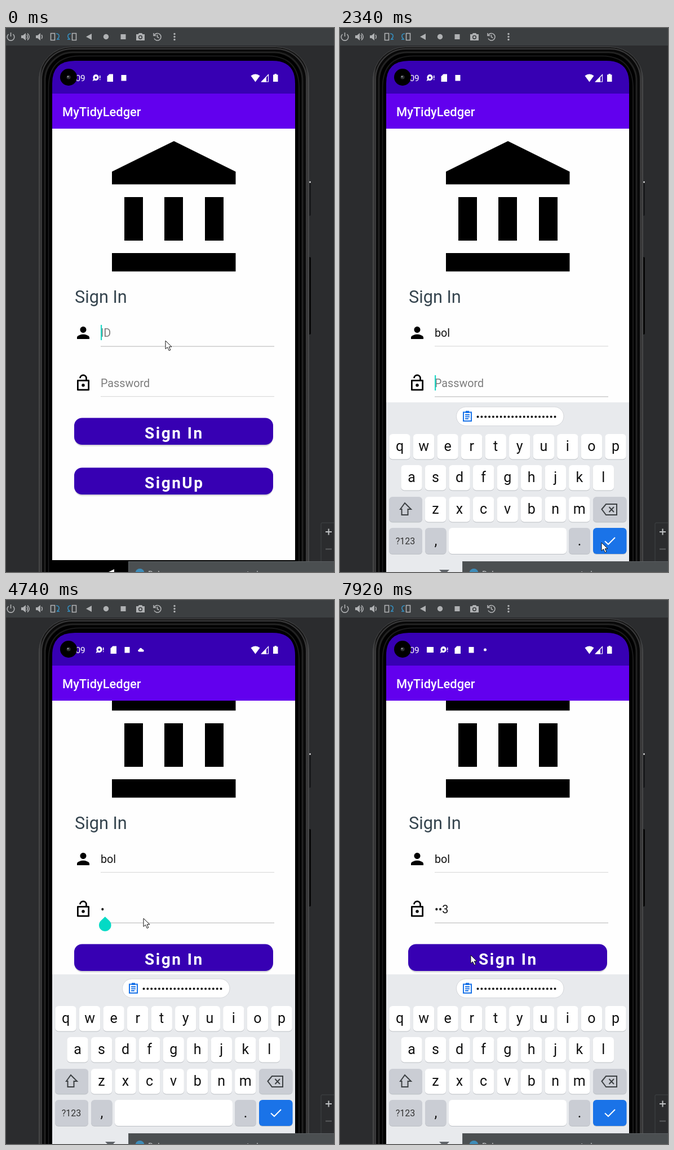
Animation of 582 by 962 pixels, one loop 8 s. Source, as an HTML page:

```html
<!DOCTYPE html>
<html lang="en">
<head>
<meta charset="utf-8">
<title>Sign-in screen</title>
<style>
  html, body { margin: 0; width: 100%; height: 100%; overflow: hidden; background: #2b2c2e; }
  svg { display: block; width: 582px; height: 962px; }
  text { font-family: Roboto, sans-serif; white-space: pre; }
  .field { font-size: 19.74px; }
  .key { font-size: 25px; text-anchor: middle; fill: #111; }
  .hint { font-size: 10.5px; text-anchor: middle; fill: #5f6368; }
  .button { font-size: 28px; font-weight: 700; letter-spacing: .0893em; fill: #fff; }
  .line { fill: none; stroke-width: 2; }
</style>
</head>
<body>
<svg viewBox="0 0 582 962">
  <defs>
    <clipPath id="screenClip"><path d="M82 962V98Q82 58 122 58H473Q513 58 513 98V962z"/></clipPath>
    <clipPath id="pageClip"><rect x="82" y="178" width="431" height="763"/></clipPath>
    <linearGradient id="rim">
      <stop offset="0" stop-color="#4a4a4b"/><stop offset=".012" stop-color="#161616"/>
      <stop offset=".985" stop-color="#161616"/><stop offset="1" stop-color="#4a4a4b"/>
    </linearGradient>
  </defs>

  <rect width="582" height="962" fill="#2b2c2e"/>
  <rect width="582" height="31" fill="#3c3f41"/>
  <g id="toolbar" class="line" stroke="#afb1b3" style="stroke-width:1.6">
    <path d="M4.5 11A6.3 6.3 0 1 0 12.500 11M8.500 8V15"/>
    <path d="M27 13H30L35 9V22L30 18H27z" fill="#afb1b3" stroke="none"/>
    <path d="M37 12Q39.500 15.500 37 19M38 9.500Q44.500 15.500 38 21.500"/>
    <path d="M53 13H56L61 9V22L56 18H53z" fill="#afb1b3" stroke="none"/>
    <path d="M63 12Q65.500 15.500 63 19"/>
    <path d="M79.500 9.500H86.500V21.500H79.500zM117.500 9.500H124.500V21.500H117.500z"/>
    <path d="M89 10Q95 10 94 16L91 20H95M115 10Q109 10 110 16L113 20H109" stroke="#3592c4"/>
    <g fill="#afb1b3" stroke="none">
      <path d="M142 15.500L152 10V21z"/><circle cx="177.500" cy="15.500" r="4.700"/>
      <rect x="203.500" y="11" width="9" height="9"/>
      <path fill-rule="evenodd" d="M231 11H234.500L236 9H241L242.500 11H246V22H231zM238.500 12.700A3.600 3.600 0 1 0 238.500 19.900A3.600 3.600 0 1 0 238.500 12.700z"/>
      <circle cx="238.500" cy="16.300" r="2"/>
      <circle cx="299" cy="10.500" r="1.700"/><circle cx="299" cy="15.500" r="1.700"/><circle cx="299" cy="20.500" r="1.700"/>
    </g>
    <path d="M262 9V13.500H266.500M263 13A6.300 6.300 0 1 1 263 18.500M268.500 12V16L271.500 17.500"/>
  </g>

  <rect x="536" y="271" width="5" height="61" rx="2" fill="#17181a"/>
  <rect x="538.500" y="271" width="2" height="3" fill="#eee"/>
  <rect x="536" y="405" width="5" height="137" rx="2" fill="#060606"/>
  <rect x="58.500" y="33.500" width="479" height="1000" rx="58" fill="url(#rim)" stroke="#48494a"/>
  <rect x="63" y="37" width="470" height="1000" rx="54" fill="#090909" stroke="#3a3a3b" stroke-width="2"/>
  <rect x="69" y="43" width="457" height="1000" rx="50" fill="#000" stroke="#222" stroke-width="3"/>
  <path d="M75.500 962V106Q75.500 50 130 49.500H465Q520 50 520 106V962" class="line" stroke="#1b1b1c"/>

  <g clip-path="url(#screenClip)">
    <rect x="82" y="58" width="431" height="904" fill="#000"/>
    <path d="M192 957L181 962.500L192 968z" fill="#fff"/>
    <rect x="82" y="178" width="431" height="763" fill="#fefefe"/>
    <g clip-path="url(#pageClip)">
      <g id="page">
        <path d="M298 200L407.500 254V276.500H188V254zM210 299H243V376H210zM281 299H314V376H281zM353 299H386V376H353zM188 398H407.500V430.500H188z"/>
        <text x="122" y="485.500" font-size="30.700" fill="#36454f">Sign In</text>
        <path transform="translate(120.500 522.500) scale(1.375)" d="M12 12c2.210 0 4-1.790 4-4s-1.790-4-4-4-4 1.790-4 4 1.790 4 4 4zm0 2c-2.670 0-8 1.340-8 4v2h16v-2c0-2.660-5.330-4-8-4z"/>
        <g transform="translate(120.500 611) scale(1.375)">
          <path class="line" d="M8 6A4 4 0 0 1 16 6V9M5 9H19V21H5z" stroke="#000" stroke-linejoin="round"/>
          <circle cx="12" cy="15" r="2"/>
        </g>
        <rect id="idLine" x="168" y="562" width="308"/>
        <rect id="pwLine" x="168" y="651" width="308"/>
        <text id="idText" class="field" x="168" y="546"/>
        <text id="pwText" class="field" x="168" y="635"/>
        <rect id="caret" width="2.200" height="27" fill="#1fd8c6"/>
        <path id="handle" d="M175.800 641L183.400 648.300A10.800 10.800 0 1 1 168.200 648.300z" fill="#03dac5"/>
        <rect x="121.500" y="691" width="352" height="48.500" rx="14" fill="#d9d9dc"/>
        <rect id="signIn" x="121" y="689.500" width="353" height="47.500" rx="14"/>
        <text class="button" x="246" y="726">Sign In</text>
        <rect x="121.500" y="779" width="352" height="48.500" rx="14" fill="#d9d9dc"/>
        <rect x="121" y="777.500" width="353" height="47.500" rx="14" fill="#3700b3"/>
        <text class="button" x="246" y="814">SignUp</text>
      </g>
      <rect id="scrollbar" x="509" width="4" height="349" fill="#a9a9a9"/>
    </g>

    <rect x="82" y="58" width="431" height="58" fill="#3700b3"/>
    <rect x="82" y="116" width="431" height="62" fill="#6200ee"/>
    <text x="100" y="155.500" font-size="21.900" font-weight="500" fill="#fff">MyTidyLedger</text>
    <text x="123.500" y="94" font-size="15.350" fill="#fff">09</text>
    <circle cx="111" cy="87" r="15" fill="#000"/>
    <circle cx="111" cy="87" r="3.600" fill="#2e3033"/><circle cx="110" cy="86" r="1.300" fill="#9a9da2"/>
    <g fill="#fff">
      <rect id="mail" x="154" y="83" width="12" height="10"/>
      <g id="notices">
        <path fill-rule="evenodd" d="M159.500 82A5.500 5.500 0 1 1 157 92.500L153.500 94L155 90A5.500 5.500 0 0 1 159.500 82zM159.500 85.700A2 2 0 1 0 159.500 89.700A2 2 0 1 0 159.500 85.700z"/>
        <path d="M166 84H167.500V89H166zM166 90.500H167.500V92H166z"/>
        <path d="M183.500 81.500H190V95H179.500V85.500z"/>
        <rect x="204.500" y="83" width="9" height="10.500"/>
        <path id="cloud" d="M229.500 91.500Q226.500 88.500 230 87.500Q232.500 82.500 236 87Q240 88 238 91.500z"/>
      </g>
      <circle id="more" cx="257.500" cy="88" r="2.500"/>
      <path d="M434.500 84.500Q442.500 78.500 450.500 84.500L442.500 95.500z"/>
      <path d="M453.500 95L465.500 82.500V95z" class="line" stroke="#fff" style="stroke-width:1.200"/>
      <path d="M453 95.500L462 86V95.500z"/>
      <path d="M476.500 81H480V82.500H482.500V95H474V82.500H476.500z"/>
    </g>

    <g id="keyboard">
      <rect x="82" y="662" width="431" height="310" fill="#e8eaed"/>
      <g id="keys"></g>
      <path d="M108.500 851L116.500 840L127.500 851H122V861H111V851z" class="line" stroke="#3c4043" transform="translate(-1.500)"/>
      <path d="M464.500 851L472 842H491V861H472zM477.500 847L486 856M486 847L477.500 856" class="line" stroke="#3c4043"/>
      <text class="key" x="116" y="913" style="font-size:16px;fill:#333">?123</text>
      <text class="key" x="170" y="915">,</text>
      <text class="key" x="425" y="915">.</text>
      <path d="M176 958H194L185 967z" fill="#5f6368"/>

      <g id="idMode">
        <g id="digitHints"></g>
        <circle cx="110" cy="687" r="17" fill="#fff" stroke="#dcdee2"/>
        <path d="M107.500 682L112.500 686.500L107.500 691" class="line" stroke="#333"/>
        <rect x="220.500" y="670" width="163" height="33.500" rx="16.700" fill="#fff" stroke="#d4d6da"/>
        <g class="clip" transform="translate(240 687)"></g>
        <text x="287" y="693" font-size="16.300" fill="#111">android:i…</text>
        <rect x="487.500" y="676" width="7" height="13" rx="3.500" fill="#3c4043"/>
        <path d="M484 685.500A7 7 0 0 0 498 685.500M491 692.500V697" class="line" stroke="#3c4043"/>
        <g class="line" stroke="#333">
          <circle cx="211.500" cy="907" r="9.500"/>
          <path d="M206.500 909.500Q211.500 915 216.500 909.500"/>
        </g>
        <circle cx="208" cy="904" r="1.600"/><circle cx="215" cy="904" r="1.600"/>
        <path d="M467 907H483M477.500 901L483.500 907L477.500 913M489 900V914" class="line" stroke="#fff"/>
      </g>
      <g id="pwMode">
        <rect x="206.500" y="670" width="190.500" height="33.500" rx="16.700" fill="#fff" stroke="#d4d6da"/>
        <g class="clip" transform="translate(226 687)"></g>
        <path d="M244.500 687.500H381.600" stroke="#111" stroke-width="4" stroke-linecap="round" stroke-dasharray="0 6.850"/>
        <path d="M470 907.500L476 913L488 901" class="line" stroke="#fff"/>
      </g>
      <g id="buttonMode">
        <g id="digitRow"></g>
        <path d="M489 901V908H469M474.500 902.500L469 908L474.500 913.500" class="line" stroke="#fff"/>
      </g>
    </g>
  </g>

  <rect x="559" y="875" width="30" height="75" rx="2" fill="#2b2c2e" stroke="#414446"/>
  <path d="M567 891H578M572.500 885.500V896.500" class="line" stroke="#c0c2c4"/>
  <path d="M567 921.500H578" class="line" stroke="#5a5d5f"/>
  <rect x="217.500" y="943.500" width="370" height="30" fill="#4b4f51" stroke="#5b5f62"/>
  <circle cx="237.500" cy="964" r="8" fill="#3e8cb8"/>
  <text x="252" y="970.500" font-size="14.500" fill="#c4c6c8">Debug app process connected</text>
  <path id="mouse" d="M0 0V14.500L3.500 11.500L6.300 17.500L8.800 16.400L6.200 10.800H11z" fill="#fff" stroke="#111"/>
</svg>

<script>
const LOOP = 8000;
const $ = id => document.getElementById(id);
const set = (id, attrs) => { for (const k in attrs) $(id).setAttribute(k, attrs[k]); };
const show = (id, on) => { $(id).style.display = on ? '' : 'none'; };

// ---- keyboard layout ----
const STEP = 42.55;
const key = (x, y, w, fill = '#fff', h = 44.5) =>
  `<rect x="${x}" y="${y + 1}" width="${w}" height="${h}" rx="6" fill="#bcbfc4"/>` +
  `<rect x="${x}" y="${y}" width="${w}" height="${h}" rx="6" fill="${fill}"/>`;
const labels = (chars, x, y, cls = 'key') =>
  [...chars].map((c, i) => `<text class="${cls}" x="${x + i * STEP}" y="${y}">${c}</text>`).join('');
const keyRow = (chars, x, y) =>
  [...chars].map((c, i) => key(x + i * STEP - 18.7, y, 37.4)).join('') + labels(chars, x, y + 30);

const GREY = '#cacdd4';
$('keys').innerHTML =
  keyRow('qwertyuiop', 106, 718) + keyRow('asdfghjkl', 127, 773) + keyRow('zxcvbnm', 169.5, 829) +
  key(87, 829, 59, GREY) + key(449, 829, 59.5, GREY) +
  key(87, 884, 59, GREY, 46) + key(151, 884, 37.5, GREY, 46) +
  key(406, 884, 38, GREY, 46) + key(449, 884, 59.5, '#1a73e8', 46) +
  `<g id="wideSpace">${key(193, 884, 209, '#fff', 46)}</g>` +
  `<g id="shortSpace">${key(193, 884, 37.5, '#fff', 46) + key(235.5, 884, 166.5, '#fff', 46)}</g>`;
$('digitHints').innerHTML = labels('1234567890', 118.5, 730, 'hint');
$('digitRow').innerHTML = labels('1234567890', 105.5, 696);
document.querySelectorAll('.clip').forEach(g => {
  g.innerHTML = '<path class="line" stroke="#1a73e8" d="M-7 -7.500H7V8H-7zM-4 -3H4M-4 .5H4M-4 4H2"/>' +
    '<rect x="-3" y="-10" width="6" height="4" fill="#1a73e8"/>';
});

// ---- timeline ----
const bursts = [[150, 1080, 8], [1200, 2220, 9], [2340, 3300, 8], [3420, 4320, 8], [4470, 5400, 8],
  [6360, 6630, 3], [7620, 7920, 3]];
const ticks = [0, 5550, 6080, 6910, 7310];
for (const [from, to, n] of bursts)
  for (let i = 0; i < n; i++) ticks.push(Math.floor((from + (to - from) * i / (n - 1)) / 10) * 10);
ticks.sort((a, b) => a - b);

const idSteps = [[0, ''], [1200, 'b'], [1320, 'bo'], [1450, 'bol']];
const pwSteps = [[0, ''], [2600, '1'], [3670, '•'], [6360, ''], [6500, '1'], [6910, '•2'], [7310, '••3']];
const focusSteps = [[0, 'id'], [2090, 'pw'], [3670, 'button'], [4190, 'pw']];
const caretSteps = [[0, 1], [400, 0], [930, 1], [1960, 0], [2090, 1], [3150, 0], [4190, 1], [4730, 0],
  [5000, 1], [5550, 0], [6080, 1], [7770, 0]];
const mousePath = [[0, 283, 553], [150, 283, 553], [680, 266, 557], [1450, 266, 557], [1960, 464, 911],
  [2220, 464, 913], [2600, 465, 905], [3570, 465, 905], [4060, 219, 534], [4190, 219, 534],
  [4730, 244, 563], [5400, 244, 563], [5550, 272, 553], [7480, 272, 553], [7920, 232, 628]];
const slidePath = [[280, 300], [410, 130], [540, 35], [680, 0]];
const scrollPath = [[3670, 0], [3930, 81]];
const barPath = [[4320, 1], [4600, 0]];
const noticePath = [[4600, 0], [4730, 6], [5000, 24]];

const stepAt = (steps, t) => steps.filter(s => s[0] <= t).pop()[1];
function tween(path, t) {
  const i = path.findIndex(p => p[0] > t);
  if (i === 0) return path[0].slice(1);
  if (i < 0) return path[path.length - 1].slice(1);
  const [a, b] = [path[i - 1], path[i]];
  const k = (t - a[0]) / (b[0] - a[0]);
  return a.slice(1).map((v, j) => v + (b[j + 1] - v) * k);
}

function field(name, value, hint, focused) {
  const text = $(name + 'Text');
  text.textContent = value || hint;
  text.setAttribute('fill', value ? '#111' : '#7d7d7d');
  set(name + 'Line', { height: focused ? 2 : 1.2, fill: focused ? '#d8d8d8' : '#dcdcdc' });
  return value ? text.getComputedTextLength() : 0;
}

function render(time) {
  const t = ticks.filter(v => v <= time).pop();
  const focus = stepAt(focusSteps, t);
  const id = stepAt(idSteps, t);
  const idWidth = field('id', id, 'ID', focus === 'id');
  const pwWidth = field('pw', stepAt(pwSteps, t), 'Password', focus === 'pw');
  $('idText').style.textDecoration = focus === 'id' && id ? 'underline 1px' : 'none';

  show('caret', focus !== 'button' && stepAt(caretSteps, t));
  set('caret', focus === 'id' ? { x: 168 + idWidth, y: 525 } : { x: 168 + pwWidth, y: 614 });
  show('handle', t >= 4470 && t < 6360);
  set('signIn', { fill: focus === 'button' ? '#4c1cba' : '#3700b3' });

  const [scroll] = tween(scrollPath, t);
  set('page', { transform: `translate(0 ${-scroll})` });
  set('scrollbar', { y: 178 + scroll * .721, opacity: t < 3670 ? 0 : tween(barPath, t)[0] });

  const [shift] = tween(noticePath, t);
  set('notices', { transform: `translate(${shift})` });
  show('cloud', t >= 4470 && shift < 20);
  show('more', shift >= 20);
  set('mail', { opacity: Math.max(0, (shift - 12) / 12) });

  set('keyboard', { transform: `translate(0 ${tween(slidePath, t)[0]})` });
  for (const mode of ['id', 'pw', 'button']) show(mode + 'Mode', focus === mode);
  show('shortSpace', focus === 'id');
  show('wideSpace', focus !== 'id');

  set('mouse', { transform: `translate(${tween(mousePath, t).map(Math.round).join(' ')})` });
}

const start = performance.now();
function loop() {
  render((performance.now() - start) % LOOP);
  requestAnimationFrame(loop);
}
loop();
</script>
</body>
</html>
```
